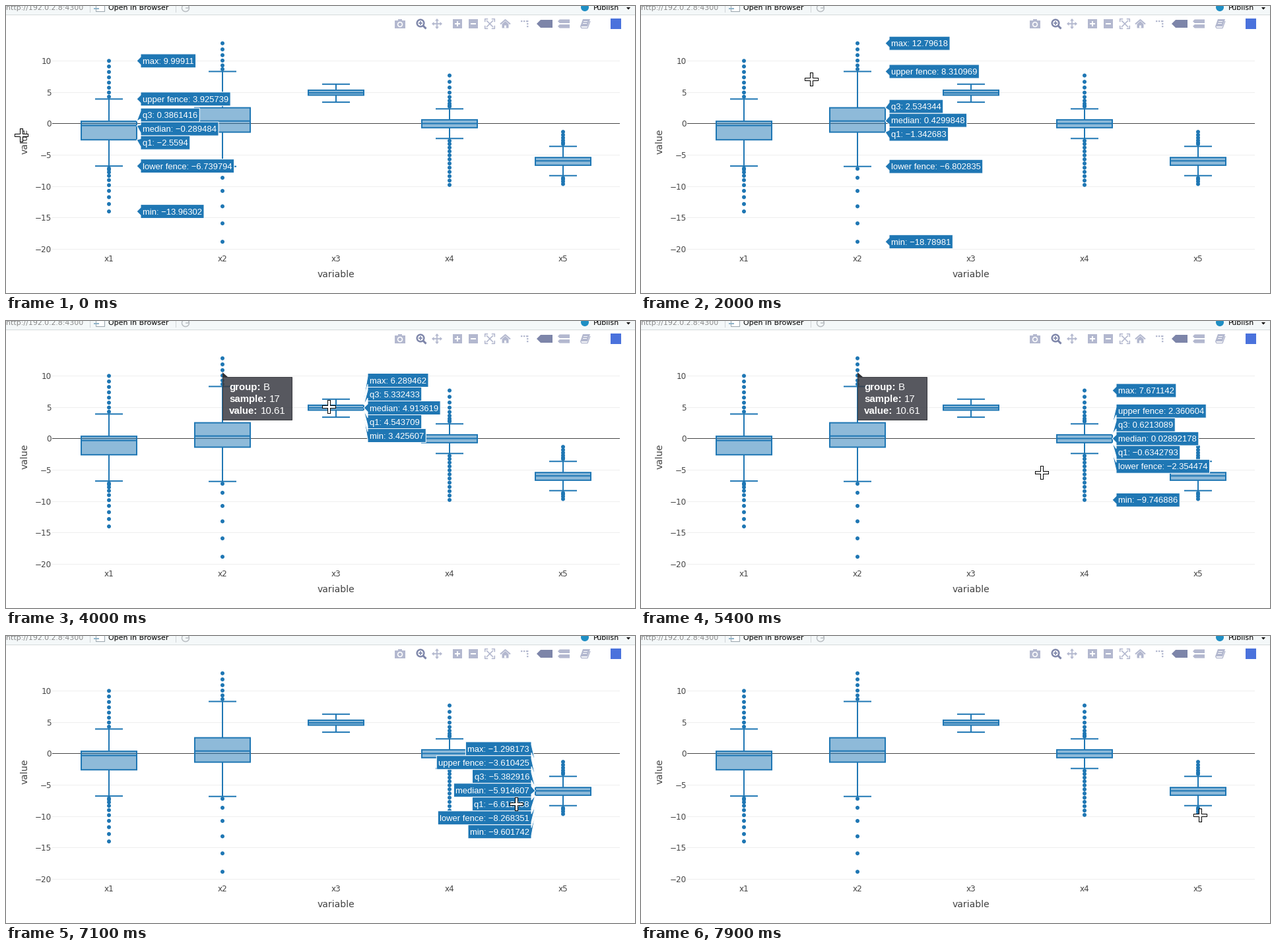
Recreate the animation shown at these times as a matplotlib script. Size 953 px wide and 436 px high, loop 8000 ms.

```python
import numpy as np
import matplotlib.pyplot as plt
from matplotlib.animation import FuncAnimation
from matplotlib.patches import Arc, Circle, Polygon, Rectangle

W, H, DPI = 953, 436, 64
PT = 72 / DPI                      # points per pixel
BLUE, INK = "#1f77b4", "#444444"
LIGHT, DARK = "#b3b8cf", "#7d85a9"
SANS, ARIAL = "DejaVu Sans", "Liberation Sans"
LEFT, SLOT, HALF = 70, 172, 42     # plot edge, category width, half a box

plt.rcParams["path.snap"] = False
fig = plt.figure(figsize=(W / DPI, H / DPI), dpi=DPI, facecolor="white")
ax = fig.add_axes([0, 0, 1, 1])
ax.set_xlim(0, W)
ax.set_ylim(H, 0)
ax.axis("off")
renderer = fig.canvas.get_renderer()


def line(xs, ys, color=INK, w=1, z=1):
    return ax.plot(xs, ys, color=color, lw=w * PT, zorder=z,
                   solid_capstyle="butt")[0]


def text(x, y, s, px=12, color=INK, font=SANS, z=1, **kw):
    kw.setdefault("va", "baseline")
    return ax.text(x, y, s, fontsize=px * PT, color=color, family=font,
                   zorder=z, **kw)


def patch(shape, face, edge="none", w=0, z=1):
    shape.set(facecolor=face, edgecolor=edge, linewidth=w * PT, zorder=z)
    return ax.add_patch(shape)


def rect(x0, y0, x1, y1, face, **kw):
    return patch(Rectangle((x0, y0), x1 - x0, y1 - y0), face, **kw)


def poly(pts, face, **kw):
    return patch(Polygon(pts, closed=True), face, **kw)


def dot(x, y, r, face, **kw):
    return patch(Circle((x, y), r), face, **kw)


def width(t):
    return t.get_window_extent(renderer).width


def ypix(v):
    return 178.8 - 9.545 * v


def centre(i):
    return LEFT + SLOT * (i + 0.5)


def minus(s):
    return s.replace("-", "\u2212")


# ---- window toolbar ----
def toolbar():
    rect(0, 0, W, 13, "#f4f8f9")
    line([0, W], [13.5, 13.5], "#d6dadc")
    text(0, 6, "http://192.0.2.8:4300", 11, "#8a8a8a")
    text(155, 6, "Open in Browser", 11, "black")
    text(890, 6, "Publish", 11, "black")
    for x in (127.5, 257.5):
        line([x, x], [0, 10], "#d0d4d6")
    rect(136.5, -4, 149.5, 8.5, "white", edge="#9aa5ad", w=1)
    line([133, 141], [4, 4], "#8fb3c9", 2)
    ax.add_patch(Arc((272, 3), 11, 11, theta1=-30, theta2=260,
                     edgecolor="#b9bec2", lw=1.5 * PT))
    line([272, 277, 277], [3, 3, -1], "#b9bec2", 1.5)
    dot(877, 2, 6, "#1f8fc4")
    poly([(940, 2), (946, 2), (943, 5.5)], "black")


# ---- chart tools ----
def tag(x0, x1, y, d, color):
    poly([(x0, y), (x0 + d, y - d), (x1, y - d), (x1, y + d), (x0 + d, y + d)],
         color)


def tools():
    before = set(ax.get_children())

    # camera
    rect(589, 22, 605, 34, LIGHT)
    rect(594, 20, 600, 22, LIGHT)
    dot(597, 28, 4.2, "white")
    dot(597, 28, 2.6, LIGHT)

    # magnifier
    dot(628, 26, 5.3, "white", edge=DARK, w=2.4)
    line([632, 636.5], [30, 34.5], DARK, 3)
    line([625, 631], [26, 26], DARK, 1.6)
    line([628, 628], [23, 29], DARK, 1.6)

    # four-way arrows
    line([647, 659], [27, 27], LIGHT, 1.8)
    line([653, 653], [21, 33], LIGHT, 1.8)
    for d in np.array([(1, 0), (-1, 0), (0, 1), (0, -1)]):
        back, side = (653, 27) + 4.5 * d, 3 * d[::-1]
        poly([(653, 27) + 8 * d, back + side, back - side], LIGHT)

    # plus and minus
    for x in (684, 708):
        rect(x - 7, 20, x + 7, 34, LIGHT)
        line([x - 4, x + 4], [27, 27], "white", 2)
    line([684, 684], [23, 31], "white", 2)

    # fit to view
    for sx in (-1, 1):
        line([728, 738], [27 - 5 * sx, 27 + 5 * sx], LIGHT, 1.6)
        for sy in (-1, 1):
            cx, cy = 733 + 7.3 * sx, 27 + 7.3 * sy
            line([cx - 4.5 * sx, cx, cx], [cy, cy, cy - 4.5 * sy], LIGHT, 1.6)

    # home
    line([749, 756.5, 764], [27.5, 21, 27.5], LIGHT, 2)
    poly([(751.5, 27.5), (756.5, 23), (761.5, 27.5), (761.5, 33.5),
          (751.5, 33.5)], LIGHT)
    rect(755, 29.5, 758, 33.5, "white")

    # dotted guides
    for k in range(3):
        rect(780 + 4 * k, 22, 782.4 + 4 * k, 24.2, LIGHT)
        rect(789, 22 + 4 * k, 791.4, 24.2 + 4 * k, LIGHT)

    tag(804, 828, 27, 6, DARK)
    tag(836, 854, 23.2, 2.8, LIGHT)
    tag(836, 854, 30.8, 2.8, LIGHT)

    # book
    poly([(874, 20), (885, 20), (881, 31), (870, 31)], LIGHT)
    line([870.5, 872, 881, 885], [31, 33.5, 33.5, 23], LIGHT, 1.4)
    for k in range(2):
        line([875 - k, 881 - k], [23.5 + 3 * k] * 2, "white")

    rect(916, 19, 932, 35, "#4a72dc")
    return [a for a in ax.get_children() if a not in before]


# ---- axes and boxes ----
def axes():
    for v in range(-20, 11, 5):
        y = np.floor(ypix(v)) + 0.5
        line([LEFT, 930], [y, y], "#eeeeee" if v else INK)
        text(69, y + 4.3, minus(str(v)), ha="right")
    for i in range(5):
        text(centre(i), 388, f"x{i + 1}", ha="center")
    text(500, 412, "variable", 14, ha="center")
    text(28.5, 206, "value", 14, ha="center", va="center", rotation=90)


NAMES = ("max", "upper fence", "q3", "median", "q1", "lower fence", "min")
STATS = [
    ("9.99911", "3.925739", "0.3861416", "-0.289484", "-2.5594",
     "-6.739794", "-13.96302"),
    ("12.79618", "8.310969", "2.534344", "0.4299848", "-1.342683",
     "-6.802835", "-18.78981"),
    ("6.289462", None, "5.332433", "4.913619", "4.543709", None, "3.425607"),
    ("7.671142", "2.360604", "0.6213089", "0.02892178", "-0.6342793",
     "-2.354474", "-9.746886"),
    ("-1.298173", "-3.610425", "-5.382916", "-5.914607", "-6.612038",
     "-8.268351", "-9.601742"),
]
# outliers above and below each box: (count, thinning towards the extreme)
OUTLIERS = [((8, 1.1), (10, 1.6)), ((6, 1.2), (6, 1.3)), (),
            ((9, 1.7), (12, 1.1)), ((6, 1.3), (4, 1.3))]


def box(i):
    x = centre(i)
    top, hi, q3, med, q1, lo, bottom = [s and ypix(float(s)) for s in STATS[i]]
    hi, lo = hi or top, lo or bottom
    rect(x - HALF, q3, x + HALF, q1, (31 / 255, 119 / 255, 180 / 255, 0.5),
         edge=BLUE, w=2, z=2)
    line([x - HALF, x + HALF], [med, med], BLUE, 2, 2)
    for end, edge in ((hi, q3), (lo, q1)):
        line([x, x], [edge, end], BLUE, 2, 2)
        line([x - HALF / 2, x + HALF / 2], [end, end], BLUE, 2, 2)
    for (n, bend), fence, far in zip(OUTLIERS[i], (hi, lo), (top, bottom)):
        near = fence + 3.5 * np.sign(far - fence)
        for u in np.linspace(0, 1, n) ** bend:
            dot(x, near + (far - near) * u, 3, BLUE, z=2)


# ---- hover labels ----
def spread(ys, gap=21):
    """Push overlapping labels apart, keeping each cluster's mean."""
    groups = []
    for y in ys:
        groups.append([y])
        while len(groups) > 1:
            a, b = groups[-2:]
            room = np.mean(b) - np.mean(a) - gap * (len(a) + len(b) - 2) / 2
            if room >= gap:
                break
            groups[-2:] = [a + b]
    return [np.mean(g) + gap * (k - (len(g) - 1) / 2)
            for g in groups for k in range(len(g))]


def hover(i):
    side = -1 if i == 4 else 1     # the last box has no room on its right
    x = centre(i) + HALF * side
    rows = [(n, s) for n, s in zip(NAMES, STATS[i]) if s]
    true = [ypix(float(s)) for _, s in rows]
    out = []
    for (name, s), y, m in zip(rows, true, spread(true)):
        t = text(x + 9 * side, m + 4.5, minus(f"{name}: {s}"), 13, "white",
                 ARIAL, 5.1, ha="left" if side > 0 else "right")
        near, far = x + 6 * side, x + (12 + width(t)) * side
        p = poly([(x, y), (near, m + 6), (near, m + 10.5), (far, m + 10.5),
                  (far, m - 10.5), (near, m - 10.5), (near, m - 6)],
                 BLUE, edge="white", w=1, z=5)
        out += [p, t]
    return out


# ---- dark point tooltips ----
def tooltip(px, py, below=False, **rows):
    y0 = py + 8 if below else py - 74
    pairs = []
    for k, (key, val) in enumerate(rows.items()):
        y = y0 + 20 + 18 * k
        pairs.append([text(0, y, s, 15, "white", ARIAL, 7, weight=wt)
                      for s, wt in ((key + ":", "bold"), (val, "normal"))])
    w = round(max(width(a) + width(b) for a, b in pairs) + 24.5)
    x0 = px if below else px - 2 - w
    for a, b in pairs:
        a.set_x(x0 + 10)
        b.set_x(x0 + 14.5 + width(a))
    body = rect(x0 + 0.5, y0 + 0.5, x0 + w - 0.5, y0 + 65.5,
                (0.23, 0.24, 0.27, 0.86), edge="#3a3b40", w=1, z=6)
    if below:
        tip = [(px, py + 1), (px, y0), (px + 8, y0)]
    else:
        tip = [(px - 1, py - 1), (px - 9, y0 + 66), (px - 2, y0 + 66)]
    return [body, poly(tip, "#303136", z=6)] + sum(pairs, [])


toolbar()
axes()
for i in range(5):
    box(i)
modebar = tools()
labels = [hover(i) for i in range(5)]

# (start, end) in ms and the artists of each point tooltip
TIPS = [
    (3000, 5900, tooltip(328, 77, True, group="B", sample="17", value="10.61")),
    (6000, 6900, tooltip(672, 252, group="A", sample="42", value="-7.632")),
    (7700, 7900, tooltip(844, 267, group="A", sample="88", value="-9.274")),
]

# ---- pointer ----
cross = [line([], [], c, w, 9) for c, w in (("black", 5), ("white", 3))]
ARROW = np.array([(0, 0), (0, 15), (3.5, 12), (6, 17.5), (8.5, 16.5),
                  (6, 11), (10.5, 11)])
arrow = poly(ARROW, "black", edge="white", w=1, z=9)

START = np.array([23, 196])
# each move: start, end, destination, strength of the slowing down
MOVES = [
    (400, 1100, (129, 179), 1.6), (1600, 2400, (322, 78), 1.6),
    (2900, 3000, (331, 92), 1), (3500, 4300, (494, 131), 3.6),
    (4800, 5400, (607, 230), 1), (5400, 6000, (667, 255), 1.6),
    (6800, 7300, (844, 255), 1), (7300, 7900, (847, 272), 1),
]


def pointer(t):
    pos = START
    for t0, t1, goal, ease in MOVES:
        u = np.clip((t - t0) / (t1 - t0), 0, 1)
        pos = pos + (np.array(goal) - pos) * (1 - (1 - u) ** ease)
    return np.round(pos)


def show(group, on):
    for a in group:
        a.set_visible(on)


def draw(n):
    t = n * 100
    x, y = pointer(t)
    on_tip = 3000 <= t < 4800 and x < 433

    # box labels follow the pointer's slot, but not right at the outliers
    slot = int((x - LEFT) // SLOT)
    if t < 500:
        slot = 0
    elif on_tip or x < LEFT or abs(x - centre(slot)) <= 6:
        slot = None
    for i, group in enumerate(labels):
        show(group, i == slot)
    for start, end, group in TIPS:
        show(group, start <= t < end)
    show(modebar, not on_tip)

    show([arrow], on_tip)
    show(cross, not on_tip)
    arrow.set_xy(ARROW + (x, y))
    cx, cy = x + 0.5, y + 0.5
    for c, r in zip(cross, (10.5, 9.5)):
        c.set_data([cx - r, cx + r, np.nan, cx, cx],
                   [cy, cy, np.nan, cy - r, cy + r])
    return []


anim = FuncAnimation(fig, draw, frames=80, interval=100, repeat=True,
                     repeat_delay=0, blit=False, init_func=lambda: [])
plt.show()
```
